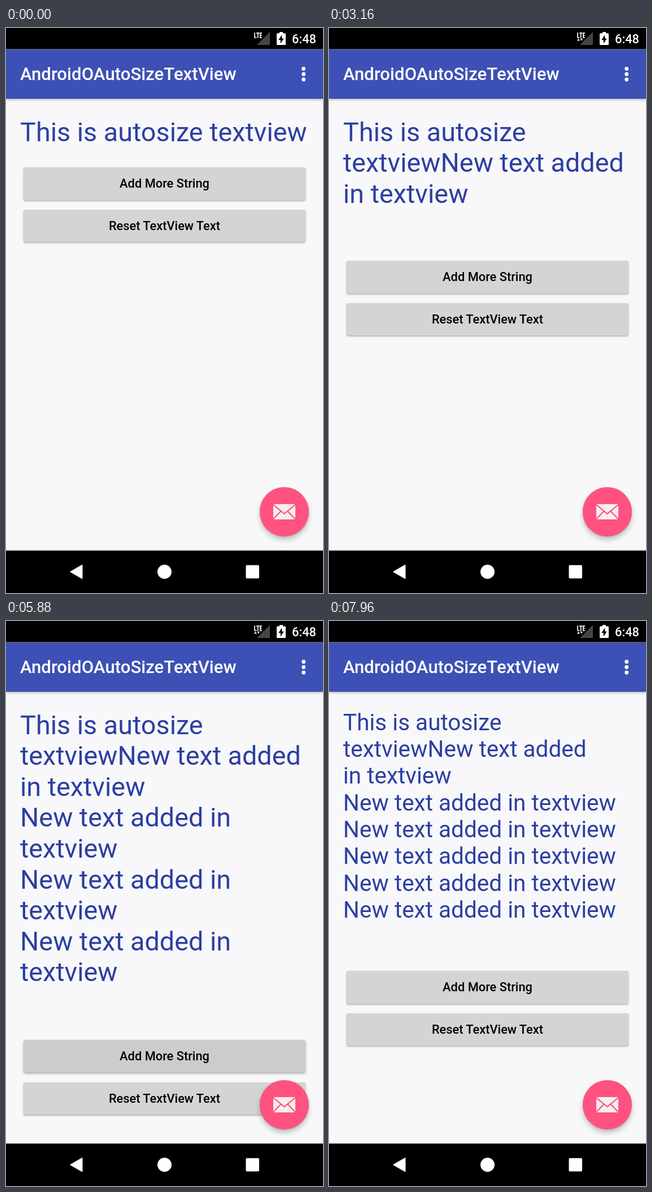
Recreate the animation shown at these times as an HTML page. Size 561 px wide and 998 px high, loop 8000 ms.

```html
<!DOCTYPE html>
<html lang="en">
<head>
<meta charset="utf-8">
<title>Auto-size text demo</title>
<style>
  html, body { margin: 0; width: 100%; height: 100%; overflow: hidden; }
  #stage {
    position: relative; width: 561px; height: 998px; overflow: hidden;
    background: #f8f8fa; font-family: Roboto, sans-serif;
  }
  #stage > * { position: absolute; }
  #appbar {
    left: 0; top: 37.5px; width: 100%; height: 87px; background: #3d50b5;
    box-shadow: 0 1px 5px rgba(0, 0, 0, .36);
  }
  #title {
    left: 25px; top: 64px; line-height: 36px;
    font-size: 31.17px; font-weight: 500; color: #fff; white-space: pre;
  }
  #clock {
    left: 506px; top: 7px; line-height: 25px;
    font-size: 21.8px; font-weight: 500; color: #fff;
  }
  #message { left: 25px; color: #2c3fa1; white-space: pre; }
  .button {
    left: 31px; width: 499px; height: 57.5px; line-height: 58px;
    border-radius: 3px; background-color: #d4d4d4;
    box-shadow: 0 1.5px 3px rgba(0, 0, 0, .32);
    color: #000; font-size: 21.8px; font-weight: 500; text-align: center;
  }
  #fab {
    left: 449px; top: 811px; width: 87px; height: 87px; border-radius: 50%;
    background: #ff527f;
    box-shadow: 0 6px 10px rgba(0, 0, 0, .22), 0 1px 3px rgba(0, 0, 0, .14);
  }
  #chrome { left: 0; top: 0; }
</style>
</head>
<body>
<div id="stage">
  <div id="message"></div>
  <div class="button" id="add">Add More String</div>
  <div class="button" id="reset">Reset TextView Text</div>
  <div id="appbar"></div>
  <div id="fab"></div>
  <svg id="chrome" width="561" height="998" viewBox="0 0 561 998" fill="#fff">
    <path fill="#000" d="M0 0H561V37.5H0ZM0 923H561V998H0Z"/>

    <!-- status icons -->
    <path fill="#454545" d="M467 7V30H444Z"/>
    <path fill="#000" d="M437 6H455V19H437Z"/>
    <path fill="none" stroke="#fff" stroke-width="1.7" d="M440 8V17H443.5M443 8.8H448.5M445.8 8V17.8M453 8.8H450V17H453M450 12.9H452.7"/>
    <path id="traffic" d="M439 22.5L441.5 18.5L444 22.5ZM444.5 18.8H449L446.8 22.8Z"/>
    <path d="M484 7H490V9.3H493.5Q495 9.3 495 11V28.5Q495 30 493.5 30H480.5Q479 30 479 28.5V11Q479 9.3 480.5 9.3H484Z"/>
    <path fill="#000" d="M488.3 12V18.5H491.8L485.8 27.5V21H482.3Z"/>

    <!-- overflow menu -->
    <circle cx="526.7" cy="72" r="3.4"/>
    <circle cx="526.7" cy="81.5" r="3.4"/>
    <circle cx="526.7" cy="91" r="3.4"/>

    <!-- envelope -->
    <rect x="473" y="841" width="39" height="27" rx="1.5" fill="#f3f0ef"/>
    <path fill="none" stroke="#ff527f" stroke-width="2.2" d="M473 842L492.5 858L512 842M473 867.5L486.5 853.5M512 867.5L498.5 853.5"/>

    <!-- navigation keys -->
    <path stroke="#fff" stroke-width="2" stroke-linejoin="round" d="M114.5 960.5L134.5 949V972Z"/>
    <circle cx="280.5" cy="960.5" r="12.5"/>
    <rect x="424.5" y="948.8" width="23.5" height="23.5" rx="2"/>
  </svg>
  <div id="title">AndroidOAutoSizeTextView</div>
  <div id="clock">6:48</div>
</div>
<script>
  const LOOP = 8000, TRAFFIC_START = 3160;
  const LARGE = { font: 46.75, line: 54.6, top: 156.7 };
  const SMALL = { font: 40.52, line: 47.3, top: 155.9 };

  // Each tap: finger down, finger up (the text changes), end of the ripple.
  const taps = [
    { down: 2280, up: 2600, end: 3120 },
    { down: 3600, up: 3840, end: 4280 },
    { down: 4520, up: 4760, end: 5240 },
    { down: 5400, up: 5640, end: 6160 },
    { down: 6320, up: 6560, end: 7040 },
    { down: 7320, up: 7560, end: 7960 }
  ];
  const buttonTops = [246, 411, 520.7, 630, 739.7, 738, 618];

  const $ = id => document.getElementById(id);
  const clamp = x => Math.max(0, Math.min(1, x));
  const message = $('message'), add = $('add'), reset = $('reset');

  function textFor(count, large) {
    if (!count) return 'This is autosize textview';
    const extra = large ? '\nNew text added in\ntextview' : '\nNew text added in textview';
    return 'This is autosize\ntextviewNew text added\nin textview' + extra.repeat(count - 1);
  }

  let shown = -1;
  function layout(count) {
    if (count === shown) return;
    shown = count;
    const size = count < 5 ? LARGE : SMALL;
    message.textContent = textFor(count, size === LARGE);
    message.style.font = `${size.font}px/${size.line}px Roboto, sans-serif`;
    message.style.top = size.top + 'px';
    add.style.top = buttonTops[count] + 'px';
    reset.style.top = buttonTops[count] + 74.8 + 'px';
  }

  function press(t) {
    const tap = taps.find(p => t >= p.down && t < p.end);
    if (!tap) {
      add.style.backgroundImage = 'none';
      add.style.boxShadow = '';
      return;
    }
    const age = t - tap.down;
    const fade = clamp((tap.end - t) / (tap.end - tap.up));
    const shade = .04 * clamp(age / 160) * fade;
    const ripple = .035 * fade;
    const radius = 290 * clamp(age / 320);
    const lift = clamp(age / 100) * clamp(1 - (t - tap.up - 120) / 200);
    const ink = a => `rgba(0,0,0,${a.toFixed(4)})`;
    add.style.backgroundImage =
      `radial-gradient(circle, ${ink(ripple)} ${radius}px, transparent ${radius + 1}px),` +
      `linear-gradient(${ink(shade)}, ${ink(shade)})`;
    add.style.boxShadow = `0 ${1.5 + 2 * lift}px ${3 + 3 * lift}px rgba(0,0,0,.32)`;
  }

  function draw() {
    const t = performance.now() % LOOP;
    layout(taps.filter(p => t >= p.up).length);
    press(t);
    $('traffic').style.display = t >= TRAFFIC_START ? '' : 'none';
    requestAnimationFrame(draw);
  }
  draw();
</script>
</body>
</html>
```
